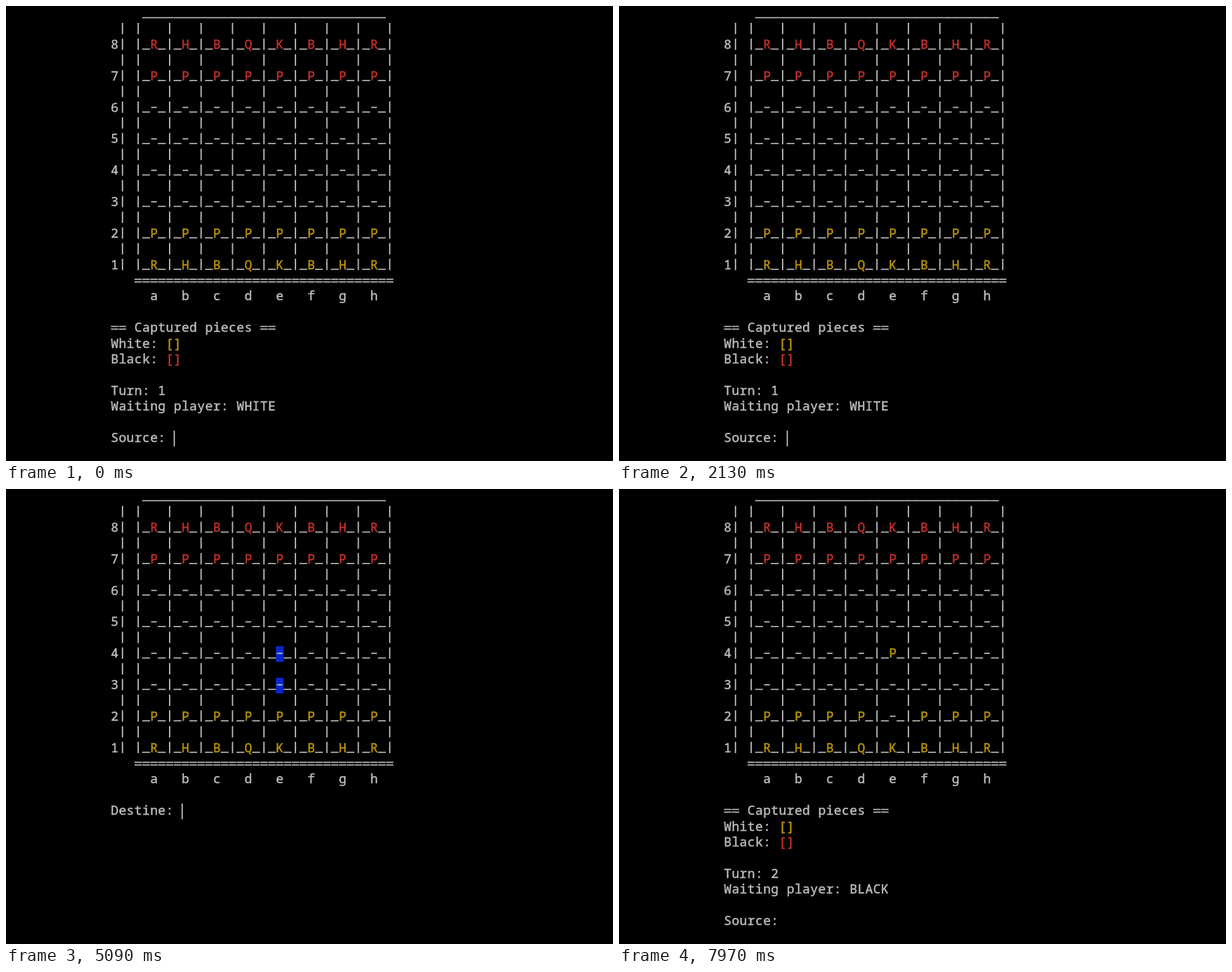
Write an HTML page with a canvas that moves like this. It is 864 by 648 pixels and loops after 8 s.

```html
<!DOCTYPE html>
<html lang="en">
<head>
<meta charset="utf-8">
<title>Console chess</title>
<style>
  html, body { margin: 0; width: 100%; height: 100%; overflow: hidden; background: #000; }
  canvas { display: block; }
</style>
</head>
<body>
<canvas id="screen" width="864" height="648"></canvas>
<script>
const ctx = document.getElementById('screen').getContext('2d');

const LOOP = 8000, BLINK = 530;
const LEFT = 149, CELL_W = 11.19, CELL_H = 22.4;
const GRAY = '#bdbdbd', RED = '#c2302c', GOLD = '#b8920c', BLUE = '#0a27c6';

// Each step sets the console state and restarts the cursor blink.
const STEPS = [
  { at: -200, prompt: 'Source: ', input: '' },
  { at: 4420, prompt: 'Source: ', input: 'e' },
  { at: 4580, prompt: 'Source: ', input: 'e2' },
  { at: 4880, prompt: 'Destine: ', input: '' },
  { at: 6200, prompt: 'Destine: ', input: 'e' },
  { at: 6380, prompt: 'Destine: ', input: 'e4' },
  { at: 7200, prompt: 'Source: ', input: '', moved: true }
];

function rect(x, y, w, h, color) {
  ctx.fillStyle = color;
  ctx.fillRect(x, y, w, h);
}

// Line-like characters are drawn as bars, all others as text in their cell.
function putChar(ch, col, row, color) {
  const x = LEFT + col * CELL_W, y = row * CELL_H;
  if (ch === '|') rect(x + CELL_W / 2 - 0.9, y + 1.6, 1.8, 16.2, color);
  else if (ch === '_') rect(x, y + 15.8, CELL_W, 1.6, color);
  else if (ch === '-') rect(x + 1.7, y + 9.2, 8, 1.7, color);
  else if (ch === '=') {
    rect(x + 0.4, y + 7.6, CELL_W - 0.8, 1.6, color);
    rect(x + 0.4, y + 11.4, CELL_W - 0.8, 1.6, color);
  } else if (ch !== ' ') {
    ctx.fillStyle = ctx.strokeStyle = color;
    ctx.fillText(ch, x + CELL_W / 2, y + 16.2);
    ctx.strokeText(ch, x + CELL_W / 2, y + 16.2);
  }
}

function put(text, col, row, color = GRAY) {
  [...text].forEach((ch, i) => putChar(ch, col + i, row, color));
}

function drawSquare(file, rank, piece, color, marked) {
  const col = 5 + file * 4, row = 2 + (8 - rank) * 2;
  if (marked) rect(LEFT + col * CELL_W, row * CELL_H, CELL_W, CELL_H, BLUE);
  put(piece, col, row, color);
}

function drawBoard(moved, choosing) {
  const ranks = { 8: 'RHBQKBHR', 7: 'PPPPPPPP', 2: 'PPPPPPPP', 1: 'RHBQKBHR' };
  if (moved) {
    ranks[2] = 'PPPP-PPP';
    ranks[4] = '----P---';
  }
  put('_'.repeat(31), 4, 0);
  for (let rank = 8; rank >= 1; rank--) {
    const row = 2 + (8 - rank) * 2;
    put(' | |' + '   |'.repeat(8), 0, row - 1);
    put(rank + '| |' + '_ _|'.repeat(8), 0, row);
    [...(ranks[rank] || '--------')].forEach((piece, file) => {
      const marked = choosing && file === 4 && (rank === 3 || rank === 4);
      const color = piece === '-' ? GRAY : rank > 6 ? RED : GOLD;
      drawSquare(file, rank, piece, color, marked);
    });
  }
  put('='.repeat(33), 3, 17);
  put([...'abcdefgh'].join('   '), 5, 18);
}

function drawStatus(moved) {
  put('== Captured pieces ==', 0, 20);
  put('White:', 0, 21);
  put('[]', 7, 21, GOLD);
  put('Black:', 0, 22);
  put('[]', 7, 22, RED);
  put('Turn: ' + (moved ? 2 : 1), 0, 24);
  put('Waiting player: ' + (moved ? 'BLACK' : 'WHITE'), 0, 25);
}

function draw(t) {
  const step = STEPS.findLast(s => s.at <= t);
  const choosing = step.prompt === 'Destine: ';
  const row = choosing ? 20 : 27;
  const line = step.prompt + step.input;

  rect(0, 0, 864, 648, '#000');
  ctx.font = '18px "Noto Sans Mono", "DejaVu Sans Mono", monospace';
  ctx.textAlign = 'center';
  ctx.lineWidth = 0.45;
  drawBoard(step.moved, choosing);
  if (!choosing) drawStatus(step.moved);
  put(line, 0, row);
  if ((t - step.at) % (2 * BLINK) < BLINK) {
    rect(LEFT + line.length * CELL_W + 0.2, row * CELL_H, 1.6, CELL_H, '#d0d0d0');
  }
}

const start = performance.now();
function frame() {
  draw((performance.now() - start) % LOOP);
  requestAnimationFrame(frame);
}
frame();
</script>
</body>
</html>
```
